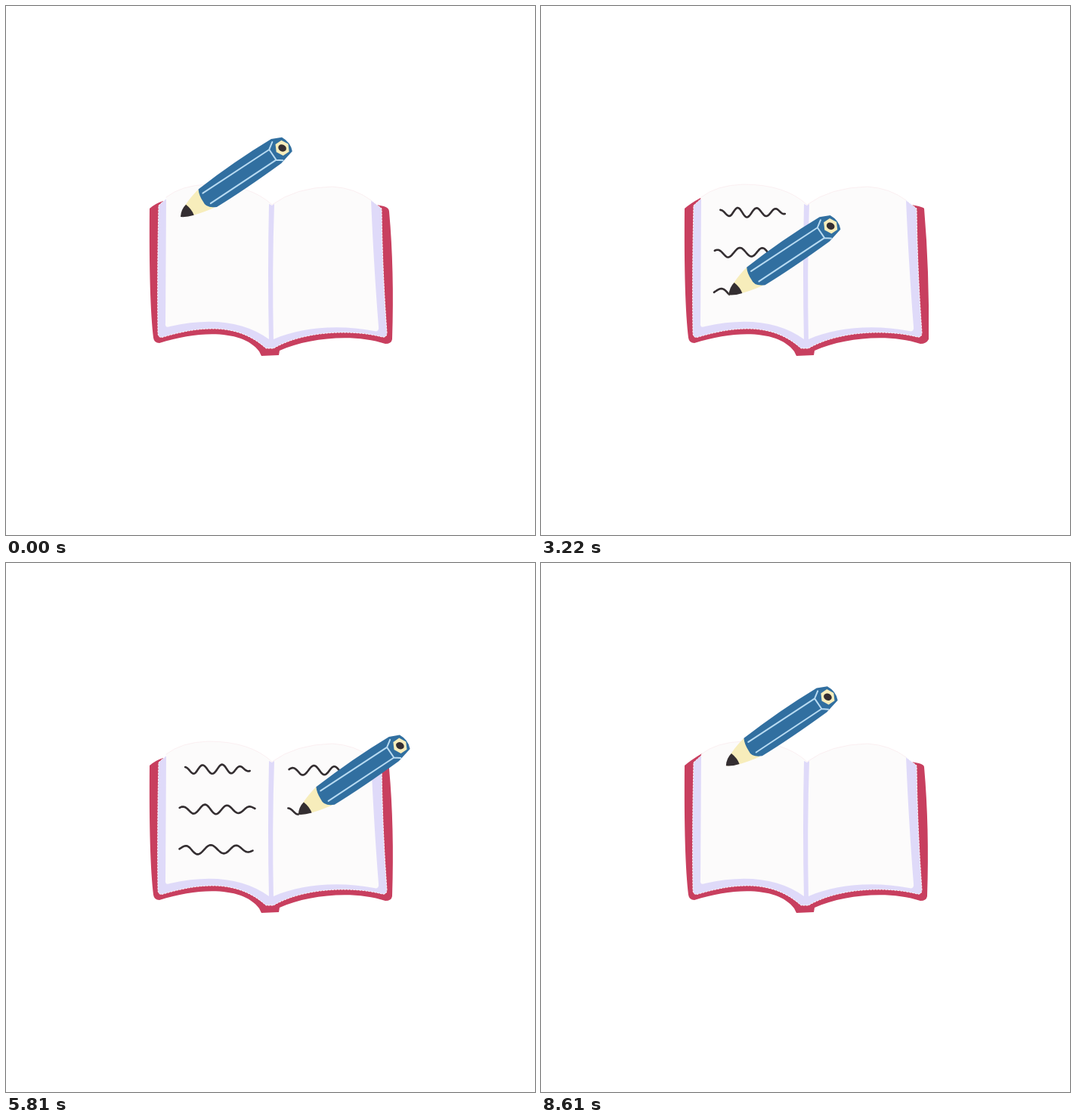
An HTML page with a canvas that plays this animation: 700 by 700 pixels, repeating every 8.68 s.

```html
<!DOCTYPE html>
<html lang="en">
<head>
<meta charset="utf-8">
<title>Notebook and pencil</title>
<style>
html, body { margin: 0; width: 100%; height: 100%; overflow: hidden; background: #fff; }
canvas { display: block; width: 100vmin; height: 100vmin; }
</style>
</head>
<body>
<canvas id="stage" width="700" height="700"></canvas>
<script>
const ctx = document.getElementById('stage').getContext('2d');
const STEP = 70, COUNT = 124, CLEAR = 118, LIFT = 114.5;
const FIRST = 5.6, PITCH = 18.8, WRITE = 14, MOVE = 3;
const RED = '#c83f5f', LILAC = '#dfdaf9', PAGE = '#fcfbfb', INK = '#342e31';
const BLUE = '#316fa0', SHINE = '#b8dbf2', WOOD = '#f7edbb', PINK = '#e9b4bc';
const REST = [231, 279];

// Written lines: left end, length, wavelength, distance to the first trough.
const lines = [
  { x: 237, length: 86, wave: 25, trough: 11 },
  { x: 230, length: 99, wave: 30, trough: 18 },
  { x: 229, length: 98, wave: 34, trough: 25 },
  { x: 375, length: 91, wave: 28, trough: 18 },
  { x: 373, length: 88, wave: 28, trough: 12 },
  { x: 366, length: 96, wave: 30, trough: 12 }
].map((line, n) => ({
  ...line,
  y: 273 + n % 3 * 53 + (n > 2 ? 1.5 : 0),
  from: FIRST + n * PITCH
}));

const clamp = t => Math.max(0, Math.min(1, t));
const ease = t => t * t * (3 - 2 * t);
const mix = (a, b, t) => a.map((v, k) => v + (b[k] - v) * t);
const progress = (line, f) => clamp((f - line.from) / WRITE);

// Point at share s of a line; the wave is lower at both ends.
function wavePoint({ x, y, length, wave, trough }, s) {
  const height = 6 * Math.min(1, 0.5 + 3 * s) * (1 - 0.7 * s ** 6);
  return [x + s * length, y + height * Math.cos(2 * Math.PI * (s * length - trough) / wave)];
}

function tipAt(f) {
  if (f >= LIFT) {
    const t = ease((f - LIFT) / (COUNT - LIFT));
    let path = [wavePoint(lines[5], 1), [540, 180], [380, 160], REST];
    while (path.length > 1) path = path.slice(1).map((p, i) => mix(path[i], p, t));
    return path[0];
  }
  const n = Math.floor((f - FIRST) / PITCH);
  if (n < 0) return mix(REST, wavePoint(lines[0], 0), ease(f / FIRST));
  const line = lines[n], next = lines[n + 1];
  const end = wavePoint(line, progress(line, f));
  const away = clamp((f - line.from - WRITE) / MOVE);
  return next ? mix(end, wavePoint(next, 0), ease(away)) : end;
}

function fill(color, d) {
  ctx.fillStyle = color;
  ctx.fill(new Path2D(d));
}

function stroke(color, width, d) {
  ctx.strokeStyle = color;
  ctx.lineWidth = width;
  ctx.stroke(new Path2D(d));
}

function drawBook(pose, pink) {
  const corner = [[208, 258], [213, 252], [211, 254]][pose];
  const right = 511 + (pose === 2 ? 2 : 0), top = 272 - 2 * pose;
  fill(RED, `M190 268Q198 261 ${corner}L240 300H470L490 263L500 265Q507 267 507 ${top}
    Q514 350 ${right} 441Q510 447 502 447C460 433 400 439 362 456L361 462L338 463L335 457
    C315 430 260 428 203 446Q196 446 195 439Q189 390 190 268Z`);
  const block = `M202 264L213 254V300H482V256L497 268Q498 350 504 432Q504 439 498 438
    C460 428 395 429 354 453H344C310 422 265 421 208 438Q201 440 201 432Q200 350 202 264Z`;
  fill(LILAC, block);
  if (!pink) {
    ctx.setLineDash([2, 2]);
    stroke('#fff', 1, block);
    ctx.setLineDash([]);
  }
  const arch = 'M212 253Q232 237 268 236Q323 236 352 263Q383 240 432 239Q462 241 483 257';
  fill(PAGE, `${arch}Q487 350 493 424Q494 432 487 430C440 421 390 425 354 441H348
    C315 417 270 412 217 424Q210 427 211 419Z`);
  if (!pink) stroke('#f8e6e9', 0.6, arch);
  fill(LILAC, 'M348 262L352 264L355 262Q352 350 354 445H348Q346 350 348 262Z');
}

function drawLines(f, pose) {
  if (f >= CLEAR) return;
  ctx.strokeStyle = INK;
  ctx.lineWidth = 2.6;
  for (const line of lines.filter(l => f >= l.from)) {
    const done = progress(line, f);
    ctx.beginPath();
    for (let i = 0; i <= 60; i++) {
      const s = done * i / 60, [x, y] = wavePoint(line, s);
      const boil = 0.5 * Math.sin(9 * s + pose * 2.1 + line.y);
      ctx.lineTo(x + boil, y - boil);
    }
    ctx.stroke();
  }
}

// The pencil lies along the x axis with its tip at 0,0 and is then turned.
function drawPencil([x, y]) {
  ctx.save();
  ctx.translate(x, y);
  ctx.rotate(-0.595);
  fill(WOOD, 'M0 0Q10 -11 40 -17L44 15Q12 9 0 0Z');
  fill(INK, 'M0 0Q6 -8 15 -9.5Q18 0 16 8Q6 5 0 0Z');
  fill(BLUE, 'M40 -17Q100 -21 157 -18L170 -12Q176 0 171 11L150 16Q90 18 47 16Q34 10 36 0Q36 -10 40 -17Z');
  stroke(SHINE, 2, 'M42 -9.5L147 -8L156 -14M43 7.5L147 8.5L154 14M147 -8V8.5');
  ctx.translate(162.5, 0);
  ctx.fillStyle = WOOD;
  ctx.beginPath();
  for (let a = 0; a < 6; a++) ctx.lineTo(9.5 * Math.cos(a * Math.PI / 3), 10.5 * Math.sin(a * Math.PI / 3));
  ctx.fill();
  ctx.fillStyle = INK;
  ctx.beginPath();
  ctx.ellipse(0, 0, 4.5, 5.5, -0.5, 0, 7);
  ctx.fill();
  ctx.restore();
}

function draw(now) {
  const f = Math.floor(now / STEP) % COUNT;
  const pose = Math.floor((f + 1) % 12 / 4);
  const pink = f < CLEAR && f % 13 === 2 && Math.floor(f / 13) % 5 !== 1;
  ctx.lineCap = ctx.lineJoin = 'round';
  ctx.fillStyle = pink ? PINK : '#fff';
  ctx.fillRect(0, 0, 700, 700);
  drawBook(pose, pink);
  drawLines(f, pose);
  drawPencil(tipAt(f));
}

const start = performance.now();
function tick() {
  draw(performance.now() - start);
  requestAnimationFrame(tick);
}
tick();
</script>
</body>
</html>
```
